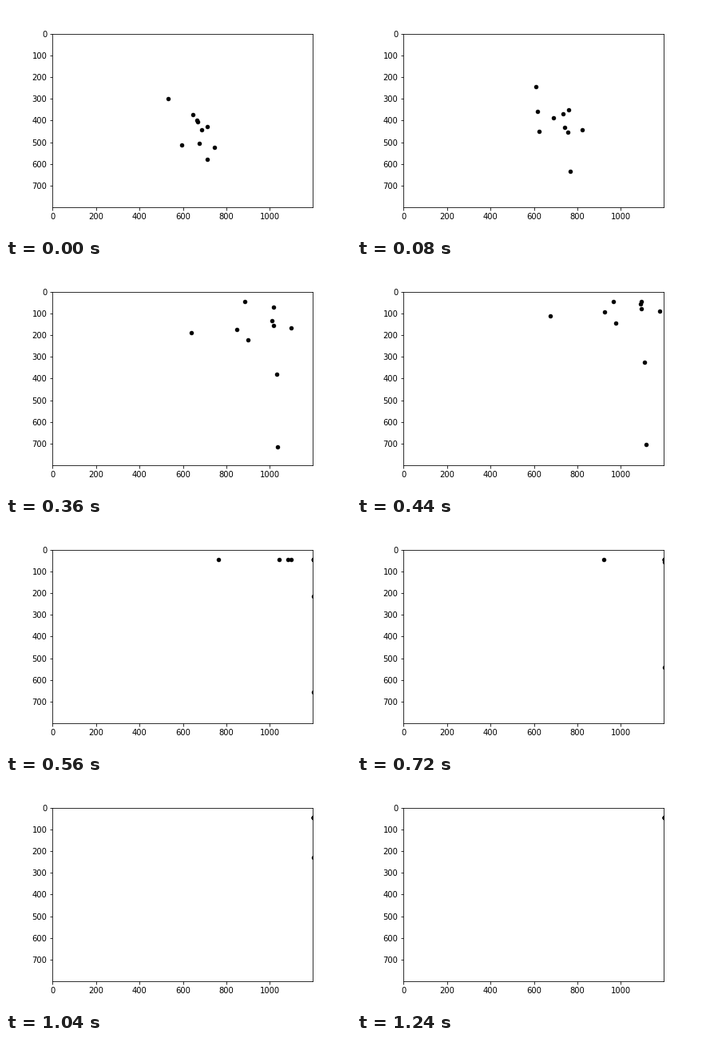
Write a matplotlib script that moves like this. It is 432x288 px and loops after 1320 ms.

```python
import numpy as np
import matplotlib.pyplot as plt
from matplotlib.animation import FuncAnimation

FRAMES, INTERVAL = 33, 40
WIDTH, HEIGHT = 1200, 800
TOP_WALL, RIGHT_WALL = 46, WIDTH
MAX_SPEED = 39.5
PULL = 3.8  # gain in speed per step, towards the upper right corner

# One key point and one first step per boid; the rest follows from the rule.
STARTS = [(530, 298), (646, 372), (664, 400), (667, 404), (711, 428),
          (686, 442), (677, 504), (747, 523), (594, 512), (711, 577)]
STEPS = [(39.5, -25.3), (-16.2, -5.1), (11.2, -4.6), (31.6, -15.8),
         (22, -39.5), (32.7, 8.3), (30.3, -34), (36, -39.5),
         (13.4, -29.9), (26.2, 30.4)]


def fly(start, step):
    """Path of the flock: constant pull, limited speed, two walls."""
    times = np.arange(FRAMES - 1)[:, None, None]
    vel = np.clip(step + times * np.array([PULL, -PULL]),
                  -MAX_SPEED, MAX_SPEED)
    travel = np.concatenate([np.zeros((1, *start.shape)),
                             np.cumsum(vel, axis=0)])
    # Walls only hold boids back, so no one returns once it arrives.
    return np.clip(start + travel, (0, TOP_WALL), (RIGHT_WALL, HEIGHT))


path = fly(np.array(STARTS, float), np.array(STEPS, float))

fig = plt.figure(figsize=(6, 4), dpi=72, facecolor="white")
fig.subplots_adjust(left=0.125, right=0.9, bottom=0.125, top=0.88)
ax = fig.add_subplot()
ax.set_aspect("equal")
ax.set_xlim(-0.5, WIDTH - 0.5)
ax.set_ylim(HEIGHT - 0.5, -0.5)
ax.set_xticks(range(0, WIDTH, 200))
ax.set_yticks(range(0, HEIGHT, 100))

dots = ax.scatter(*path[0].T, s=20, c="black", linewidths=1)


def update(frame):
    dots.set_offsets(path[frame])
    return dots,


anim = FuncAnimation(fig, update, frames=FRAMES, interval=INTERVAL,
                     repeat=True, repeat_delay=0)
plt.show()
```
